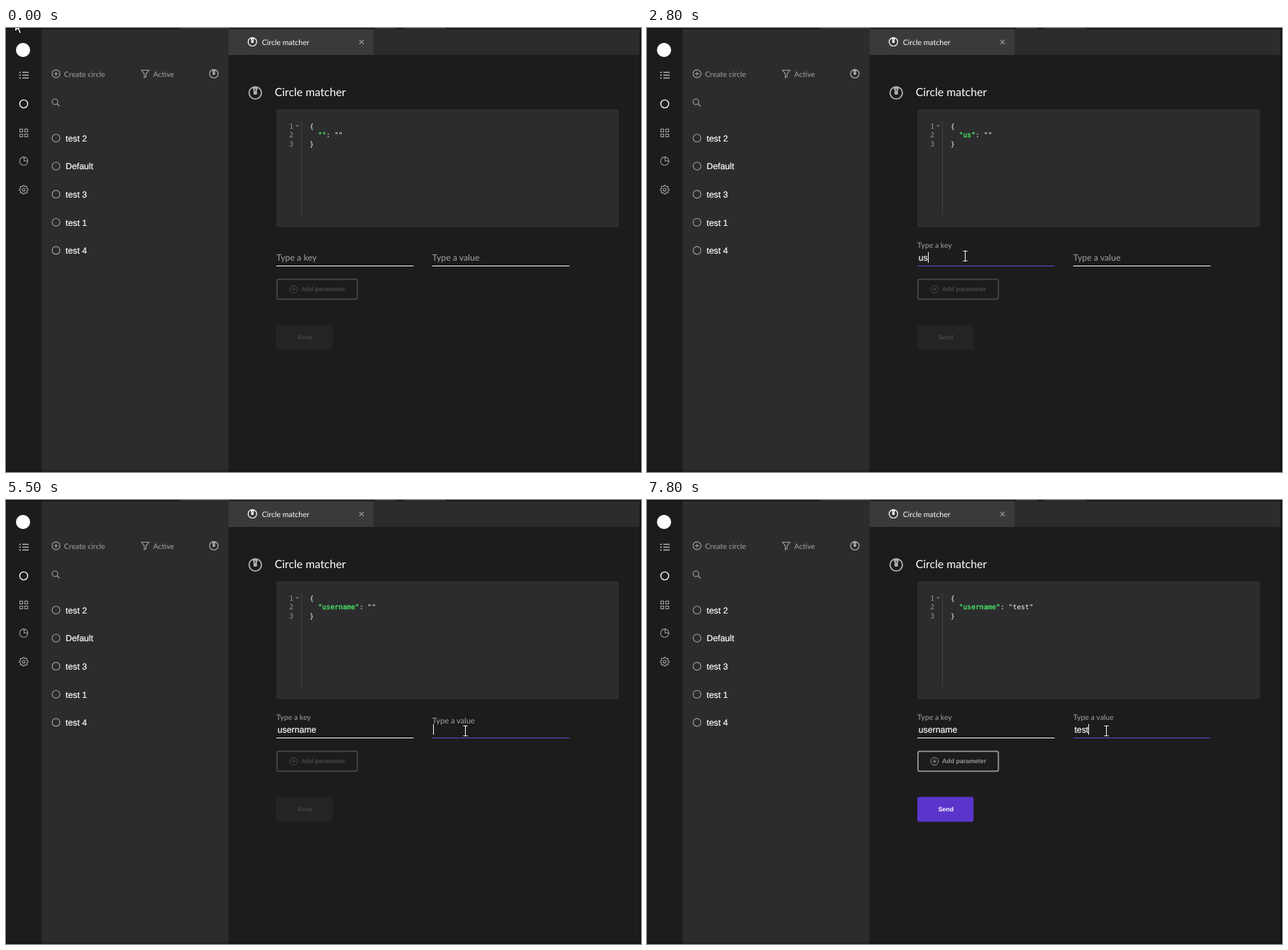
Animation, 895 px wide and 626 px high, one loop 8 s. Source, as an HTML page:

```html
<!DOCTYPE html>
<html lang="en">
<head>
<meta charset="utf-8">
<title>Circle matcher</title>
<style>
  html, body { margin: 0; width: 100%; height: 100%; overflow: hidden; background: #1c1c1d; }
  svg { display: block; width: 895px; height: 626px; }
  text { font: 10.56px Lato, sans-serif; fill: #a3a3a7; white-space: pre; text-rendering: geometricPrecision; }
  .arial { font: 12.32px "Liberation Sans", Arial, sans-serif; fill: #fff; stroke: #fff; stroke-width: .2; }
  .code text { font: 9.68px "DejaVu Sans Mono", monospace; fill: #f8f8f2; }
  .code .gutter { fill: #96969a; }
  .code .key { fill: #4dfb6c; stroke: #4dfb6c; stroke-width: .25; }
  .button { font: bold 8.8px "Liberation Sans", Arial, sans-serif; }
  .line { fill: none; stroke: #a3a3a7; stroke-width: 1.1; }
  .white { stroke: #fff; }
  .add { --tone: #48484a; }
  .add.on { --tone: #98989b; }
  .add rect, .add path, .add circle { fill: none; stroke: var(--tone); }
  .add text { fill: var(--tone); }
  .send rect { fill: #242426; }
  .send text { fill: #454547; }
  .send.on rect { fill: #5b35cb; }
  .send.on text { fill: #fff; }
</style>
</head>
<body>
<svg viewBox="0 0 895 626">
  <defs>
    <g id="pendulum">
      <circle r="8.7" fill="none" stroke="currentColor" stroke-width="1.8"/>
      <path d="M-4-8.5H4L1.8-1H-1.8Z" fill="currentColor"/>
      <circle r="2.6" fill="currentColor"/>
      <path d="M0-6V-3" stroke="#2c2c2e" stroke-width="1.2"/>
    </g>
  </defs>

  <rect width="895" height="626" fill="#1c1c1d"/>
  <rect x="50" width="263.5" height="626" fill="#2c2c2e"/>
  <rect x="313.5" width="580" height="38" fill="#2c2c2e"/>
  <rect x="313.5" width="204.5" height="38" fill="#3a3a3c"/>
  <rect width="895" height="1.3" fill="#0c0c0d"/>
  <path d="M245 .5h70M520 .5h30M560 .5h60" stroke="#3c3c3e"/>
  <rect y="623" width="895" height="3" fill="#000" opacity=".22"/>
  <rect x="893" width="2" height="626" fill="#111112"/>

  <circle cx="24" cy="31" r="10" fill="#fff"/>

  <g class="line">
    <path d="M18.500 62.500h2.500m2 0h9M18.500 66.500h2.500m2 0h9M18.500 70.500h2.500m2 0h9" stroke="#b4b4b7" stroke-width="1.500"/>
    <circle class="white" cx="25" cy="107" r="5.600" stroke-width="1.400"/>
    <path d="M19.500 142.500h4v4h-4zM26.500 142.500h4v4h-4zM19.500 149.500h4v4h-4zM26.500 149.500h4v4h-4z"/>
    <circle cx="25" cy="187.700" r="5.800"/>
    <path d="M25.500 182V187.500H31"/>
    <path id="gear"/>
    <circle cx="25" cy="228" r="2"/>
    <circle cx="70.500" cy="64.500" r="5.600"/>
    <path d="M67.500 64.500h6M70.500 61.500v6"/>
    <path d="M191 59.500h10.500l-4 5v4l-2.600 1.500v-5.500Z"/>
    <circle cx="69" cy="104" r="4"/>
    <path d="M72 107l3.500 3.500"/>
    <path d="M498 16.700l6.200 6.200m0-6.200l-6.200 6.200"/>
  </g>
  <text x="81.800" y="68.500">Create circle</text>
  <text x="207.500" y="68.500">Active</text>
  <g color="#b0b0b3">
    <use href="#pendulum" transform="translate(293 64.500) scale(.69)"/>
    <use href="#pendulum" transform="translate(351.300 91.500)"/>
  </g>
  <use href="#pendulum" color="#fff" transform="translate(347.300 19.500) scale(.69)"/>
  <text x="360.700" y="23.700" style="fill:#fff">Circle matcher</text>
  <text x="378.700" y="95.700" style="fill:#fff;font-size:15.840px">Circle matcher</text>
  <g id="list"></g>

  <rect x="381" y="114.500" width="483" height="166.500" rx="3" fill="#2c2c2e"/>
  <path d="M416.500 131V264" stroke="#434346"/>
  <path d="M408 137h5l-2.500 2.600Z" fill="#77777a"/>
  <g class="code">
    <text class="gutter" x="399.200" y="142">1</text>
    <text class="gutter" x="399.200" y="154.300">2</text>
    <text class="gutter" x="399.200" y="166.600">3</text>
    <text x="428" y="142">{</text>
    <text x="439.700" y="154.300"><tspan class="key" id="jsonKey"></tspan>: <tspan id="jsonValue"></tspan></text>
    <text x="428" y="166.600">}</text>
  </g>

  <g id="fields"></g>

  <g class="add" id="add">
    <rect x="381.900" y="354.400" width="113.400" height="28" rx="2.500" stroke-width="1.760"/>
    <circle cx="405.300" cy="368.400" r="5.400"/>
    <path d="M402.500 368.400h5.600M405.300 365.600v5.600"/>
    <text class="button" x="416" y="371.300">Add parameter</text>
  </g>
  <g class="send" id="send">
    <rect x="381" y="418.500" width="79.300" height="35.200" rx="3"/>
    <text class="button" x="410.500" y="438.700">Send</text>
  </g>

  <path id="arrow" d="M0 0V17L4 13.200L6.600 19.200L9 18.200L6.400 12.300H12Z" fill="#fff" stroke="#000"/>
  <path id="beam" d="M-3-7H3M0-7V7M-3 7H3" fill="none" stroke="#fff"/>
</svg>

<script>
const LOOP = 8000, STEP = 100;
const $ = id => document.getElementById(id);

function make(parent, tag, attrs, text = '') {
  const node = document.createElementNS('http://www.w3.org/2000/svg', tag);
  for (const name in attrs) node.setAttribute(name, attrs[name]);
  node.textContent = text;
  return parent.appendChild(node);
}

['test 2', 'Default', 'test 3', 'test 1', 'test 4'].forEach((name, i) => {
  const y = 155.2 + i * 39.6;
  make($('list'), 'circle', { class: 'line', cx: 70.5, cy: y, r: 5.5 });
  make($('list'), 'text', { class: 'arial', x: 84, y: y + 4.6 }, name);
});

const gear = Array.from({ length: 32 }, (_, i) => {
  const a = (i - 0.5) * Math.PI / 16, r = i % 4 < 2 ? 6.2 : 4.9;
  return `${(25 + r * Math.cos(a)).toFixed(2)} ${(228 + r * Math.sin(a)).toFixed(2)}`;
});
$('gear').setAttribute('d', `M${gear.join('L')}Z`);

// hidden: the spans in which the blinking caret is not drawn
function makeField(x, label, word, keyTimes, focusAt, blurAt, hidden) {
  const root = $('fields');
  return {
    x, word, keyTimes, focusAt, blurAt, hidden,
    line: make(root, 'path', { d: `M${x} 335.5h193.5` }),
    label: make(root, 'text', { x }, label),
    input: make(root, 'text', { class: 'arial', x: x + 1.7, y: 328 }),
    caret: make(root, 'rect', { y: 316, width: 1, height: 15, fill: '#fff' })
  };
}

const keyField = makeField(381, 'Type a key', 'username',
  [2600, 2800, 3000, 3200, 3400, 3500, 3700, 3900], 1300, 5500, [[2000, 2500], [4400, 4900]]);
const valueField = makeField(600.7, 'Type a value', 'test',
  [6400, 6500, 6700, 6800], 5400, LOOP, [[6200, 6400], [7300, 7800]]);

function drawField(f, t) {
  const typed = f.word.slice(0, f.keyTimes.filter(k => k <= t).length);
  const focused = t > f.focusAt && t < f.blurAt;
  const rise = 1 - (1 - Math.min(1, Math.max(0, (t - f.focusAt) / 300))) ** 3;
  f.label.setAttribute('y', 328.3 - 18.6 * rise);
  f.label.style.fontSize = 12.32 - 1.76 * rise + 'px';
  f.line.setAttribute('stroke', focused ? '#5252d0' : '#fff');
  f.input.textContent = typed;
  const width = typed ? f.input.getComputedTextLength() : 0;
  f.caret.setAttribute('x', Math.round(f.x + 1.6 + width));
  const shown = focused && !f.hidden.some(([from, to]) => t >= from && t < to);
  f.caret.style.display = shown ? '' : 'none';
  return typed;
}

// Pointer path: time, x, y
const path = [
  [0, 12, -12], [400, 12, -12], [500, 95, 70], [600, 270, 215], [700, 430, 335],
  [800, 498, 382], [900, 488, 370], [1000, 470, 348], [1100, 458, 334],
  [1200, 451, 325], [1300, 448, 321], [4800, 448, 321], [4900, 453, 320],
  [5000, 478, 324], [5100, 528, 333], [5200, 585, 338], [5300, 628, 334],
  [5400, 645, 327], [5500, 647, 325], [LOOP, 647, 325]
];

function pointerAt(t) {
  const i = path.findIndex(p => p[0] > t);
  const [t0, x0, y0] = path[i - 1], [t1, x1, y1] = path[i];
  const k = (t - t0) / (t1 - t0);
  return [Math.round(x0 + (x1 - x0) * k), Math.round(y0 + (y1 - y0) * k)];
}

function drawPointer(t) {
  const [x, y] = pointerAt(t);
  const overField = y > 312 && y < 336 && [keyField, valueField].some(f => x > f.x && x < f.x + 193);
  $('beam').style.display = overField ? '' : 'none';
  $('arrow').style.display = overField ? 'none' : '';
  $(overField ? 'beam' : 'arrow').setAttribute('transform', `translate(${x + 0.5} ${y + 0.5})`);
}

function draw(now) {
  const t = Math.floor((now % LOOP) / STEP) * STEP;
  const key = drawField(keyField, t), value = drawField(valueField, t);
  $('jsonKey').textContent = `"${key}"`;
  $('jsonValue').textContent = `"${value}"`;
  const ready = key !== '' && value !== '';
  $('add').classList.toggle('on', ready);
  $('send').classList.toggle('on', ready);
  drawPointer(t);
}

const start = performance.now();
function tick() {
  draw(performance.now() - start);
  requestAnimationFrame(tick);
}
tick();
</script>
</body>
</html>
```
